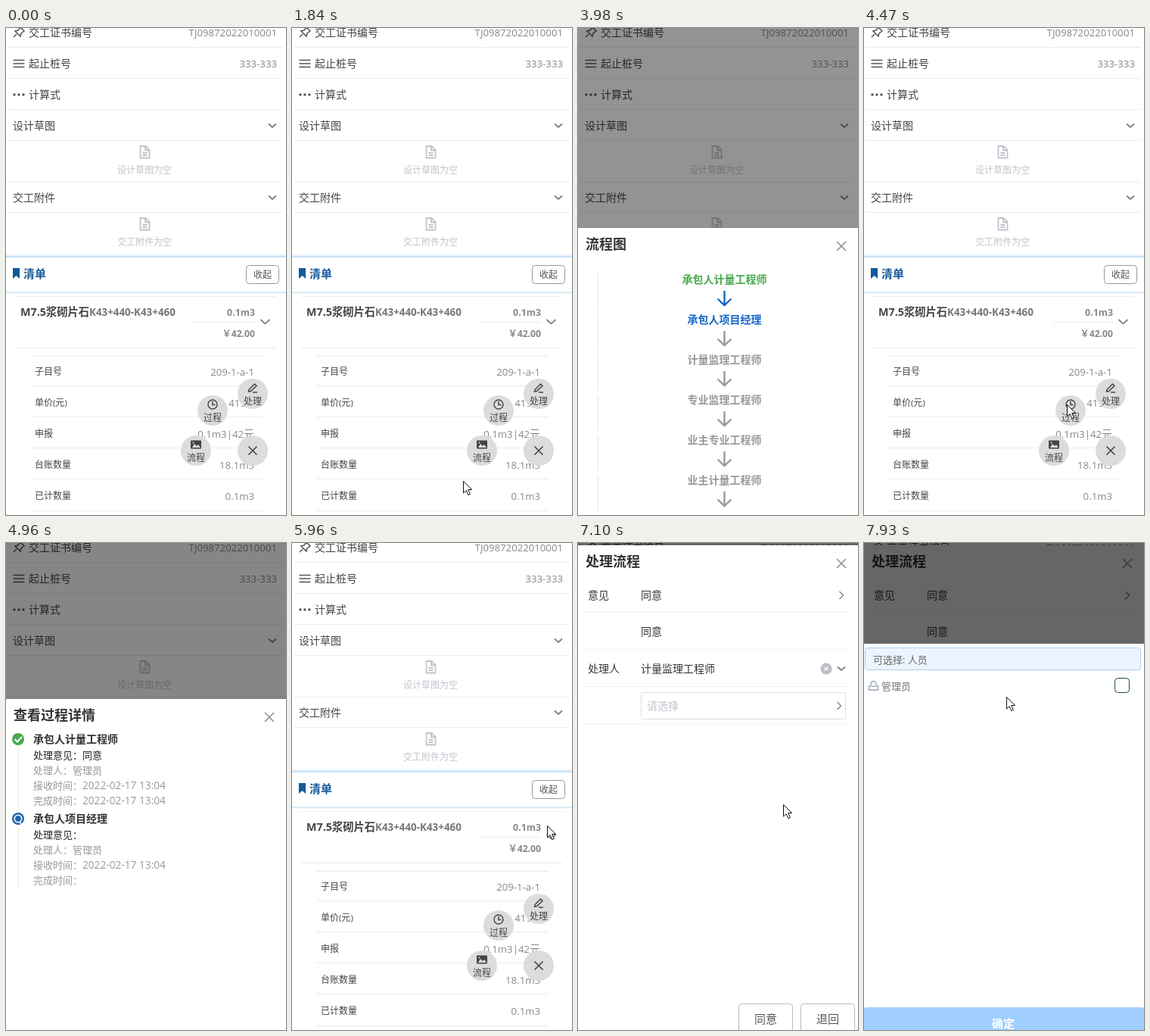
Animation, 370 px wide and 643 px high, one loop 8000 ms. Source, as an HTML page:

```html
<!DOCTYPE html>
<html lang="zh-CN">
<meta charset="utf-8">
<style>
html, body { margin: 0; width: 100%; height: 100%; overflow: hidden; background: #fff }
svg { display: block; font-family: 'Open Sans', 'Noto Sans CJK SC', 'Noto Sans CJK', sans-serif }
.latin { font-size: .943em }
</style>
<svg id="stage" width="370" height="643" viewBox="0 0 370 643"></svg>
<script>
const stage = document.getElementById('stage');

// Text is placed by its vertical centre; Latin runs are set slightly smaller.
function text(x, cy, str, { size = 14, fill = '#444', bold = false, anchor = 'start' } = {}) {
  const body = bold ? str : str.replace(/[!-~]+/g, run => `<tspan class="latin">${run}</tspan>`);
  return `<text x="${x}" y="${cy + size * .37}" font-size="${size}" fill="${fill}" text-anchor="${anchor}"${bold ? ' font-weight="700"' : ''}>${body}</text>`;
}
const path = (d, stroke = '#555', width = 1.5, fill = 'none') =>
  `<path d="${d}" stroke="${stroke}" stroke-width="${width}" fill="${fill}"/>`;
const rect = (x, y, w, h, fill, stroke = 'none', rx = 0) =>
  `<rect x="${x}" y="${y}" width="${w}" height="${h}" rx="${rx}" fill="${fill}" stroke="${stroke}"/>`;
const circle = (x, y, r, fill, stroke = 'none', width = 1.4) =>
  `<circle cx="${x}" cy="${y}" r="${r}" fill="${fill}" stroke="${stroke}" stroke-width="${width}"/>`;
const rule = (y, x1 = 2, x2 = 366, color = '#ececec') => path(`M${x1} ${y}H${x2}`, color, 1);
const down = (x, y, r = 5) => path(`M${x - r} ${y - r / 2}l${r} ${r * .9} ${r} ${-r * .9}`, '#808080', 1.8);
const right = (x, y) => path(`M${x - 2.5} ${y - 5}l5 5-5 5`, '#909090', 1.7);
const cross = (x, y, r, color, width = 1.6) =>
  path(`M${x - r} ${y - r}l${2 * r} ${2 * r}m0 ${-2 * r}l${-2 * r} ${2 * r}`, color, width);

function mainPage() {
  const end = { fill: '#888', anchor: 'end' };
  const pale = { size: 12, fill: '#c0c4cc', anchor: 'middle' };
  const attachment = (y, title) => text(9, y, title) + down(352, y) +
    path(`M177.500 ${y + 27}h7l5 5v10.500h-12zM184 ${y + 27}v5.500h5M180.500 ${y + 36}h6m-6 3h6`, '#c0c4cc', 1.8) +
    text(183, y + 59, title + '为空', pale);
  const rows = [['子目号', '209-1-a-1'], ['单价(元)', '419.9'], ['申报', '0.1m3|42元'],
    ['台账数量', '18.1m3'], ['已计数量', '0.1m3']];
  return rect(0, 0, 370, 643, '#fff') +
    path('M10 12l4-4M12 4l7 7 1-4 4-3-5-5-3 4z') + text(30, 6, '交工证书编号') + text(358, 6, 'TJ09872022010001', end) +
    path('M9.500 42.500h15m-15 4.500h15m-15 4.500h15') + text(30, 47, '起止桩号') + text(358, 47, '333-333', end) +
    [11, 17, 23].map(x => circle(x, 88, 1.7, '#555')).join('') + text(30, 88, '计算式') +
    [25.5, 66.5, 107.5, 148.5, 203.5, 243.5].map(y => rule(y)).join('') +
    attachment(129, '设计草图') + attachment(224, '交工附件') +
    rect(0, 299, 370, 2, '#e6f2fc') + rect(0, 301, 370, 2, '#c6e2f8') +
    rect(0, 348, 370, 2, '#dcebf7') + rect(0, 350, 370, 1, '#f0f7fc') +
    path('M9 317h9v14l-4.500-4-4.500 4z', 'none', 0, '#0f5a9e') +
    text(23, 324, '清单', { size: 15, fill: '#1a5b9c', bold: true }) +
    rect(317.5, 313.5, 43, 24, '#fff', '#999', 4) + text(339, 326, '收起', { size: 12, fill: '#555', anchor: 'middle' }) +
    rule(354.5, 12, 357) + text(19, 375, 'M7.5浆砌片石', { size: 14.3, bold: true }) +
    text(110, 375, 'K43+440-K43+460', { size: 13.4, fill: '#777', bold: true }) +
    text(329, 375, '0.1m3', { ...end, size: 12.4, bold: true }) + rule(388.5, 249, 329) +
    text(329, 403, '￥42.00', { ...end, size: 12.2, bold: true }) + down(342.5, 388, 6) + rule(422.5, 12, 357) +
    rows.map(([name, value], i) => rule([433.5, 472.5, 513.5, 554.5, 595.5][i], 32, 339) +
      text(38, 454 + 41 * i, name, { size: 12 }) + text(328, 454 + 41 * i, value, end)).join('') +
    rule(637.5, 32, 339);
}

function fabMenu() {
  const item = (x, y, label, icon) => circle(x, y, 20, '#dcdcdc') +
    `<g transform="translate(${x} ${y - 8})">${icon}</g>` + text(x, y + 10, label, { size: 12, anchor: 'middle' });
  return item(326, 483, '处理', path('M-5 2.500L2.500-5 5-2.500-2.500 4.500-5.500 5zM0 6h6', '#444')) +
    item(273, 505, '过程', circle(0, 0, 6, 'none', '#444') + path('M0-4V.5H3.500', '#444')) +
    item(251, 558, '流程', rect(-7, -5.5, 14, 11, '#444', 'none', 1) +
      path('M-5 4l3-5 3 3 2-2 3 4z', 'none', 0, '#dcdcdc') + circle(-3.5, -2.5, 1, '#dcdcdc'));
}

const sheet = title => rect(0, 3, 370, 660, '#fff') +
  text(10, 24, title, { size: 18, fill: '#333', bold: true }) + cross(348, 27, 6, '#909090');

function flowSheet() {
  const steps = ['承包人计量工程师', '承包人项目经理', '计量监理工程师', '专业监理工程师', '业主专业工程师', '业主计量工程师', '完成'];
  return sheet('流程图') + steps.map((name, i) => {
    const y = 53 * i, last = i === steps.length - 1;
    const arrow = path(`M193.500 ${y + 86}v19m-9-8.500l9 8.500 9-8.500`, i ? '#999' : '#1467c8', 2.4);
    return path(`M26.500 ${y + 64}v${last ? 18 : 48}`, '#e8e8e8', 1) + (last ? '' : arrow) +
      text(193.5, y + 71, name, { fill: ['#4aa84c', '#1467c8'][i] || '#999', bold: true, anchor: 'middle' });
  }).join('');
}

function detailSheet() {
  const entry = (y, name, opinion, done, mark) => {
    const line = (dy, label, value, fill = '#999') => text(36, y + dy, label, { size: 13, fill }) +
      text(36 + 13 * label.length, y + dy, value, { size: /\d/.test(value) ? 14.5 : 13, fill });
    const time = '2022-02-17 13:04';
    return path(`M16.500 ${y + 12}v81`, '#e4e4e4', 1) + mark + text(36, y, name, { fill: '#333', bold: true }) +
      line(21, '处理意见：', opinion, '#222') + line(41, '处理人：', '管理员') +
      line(61, '接收时间：', time) + line(81, '完成时间：', done ? time : '');
  };
  return sheet('查看过程详情') +
    entry(56, '承包人计量工程师', '同意', true, circle(16, 56, 8, '#4aa84c') + path('M11.500 56l3.500 3.500 6-6.500', '#fff', 2.2)) +
    entry(161, '承包人项目经理', '', false, circle(16, 161, 8, '#2263ae') + circle(16, 161, 4.7, 'none', '#fff', 1.6) +
      path('M17 165l4 3', '#fff', 1.4));
}

function handleSheet() {
  const dark = { fill: '#333' };
  const button = (x, label) => rect(x, 608.5, 71, 40, '#fff', '#bbb', 4) +
    text(x + 35.5, 628, label, { size: 15, fill: '#555', anchor: 'middle' });
  return sheet('处理流程') + text(13, 69, '意见', dark) + text(83, 69, '同意', dark) + right(348, 69) +
    text(83, 117, '同意', dark) + text(13, 166, '处理人', dark) + text(83, 166, '计量监理工程师', dark) +
    circle(328, 166, 7.5, '#bcbfc6') + cross(328, 166, 2.3, '#fff', 1.3) + down(348, 166) +
    [91.5, 140.5, 189.5, 239.5].map(y => rule(y, 6, 360, '#f0f0f0')).join('') +
    rect(83.5, 197.5, 270, 35, '#fff', '#dcdfe6', 2) + text(91, 215, '请选择', { fill: '#c0c4cc' }) + right(345, 215) +
    button(212.5, '同意') + button(294.5, '退回');
}

function pickerSheet() {
  return rect(0, 133, 370, 530, '#fff') + rect(1.5, 138.5, 364, 29, '#ecf5ff', '#a9d0ee', 3) +
    text(12, 154, '可选择: 人员', { size: 13, fill: '#666' }) +
    circle(12.5, 186, 3.5, 'none', '#9aa7b8', 1.3) + path('M9 189H6.500v5h12v-5H16', '#9aa7b8', 1.3) +
    text(23, 189, '管理员', { size: 13, fill: '#777' }) + rect(331.5, 178.5, 19, 19, '#fff', '#1f5228', 4) +
    rect(0, 613, 370, 45, '#a0cfff', 'none', 3) + text(184, 634, '确定', { size: 15, fill: '#fff', bold: true, anchor: 'middle' });
}

// Bottom sheets: opening time, closing time, travel, top of the shaded area
const SLIDE = 320;
const sheets = [
  { draw: flowSheet, open: 2400, close: 3842, travel: 650, top: 0 },
  { draw: detailSheet, open: 4760, close: 5430, travel: 650, top: 0 },
  { draw: handleSheet, open: 6600, close: Infinity, travel: 650, top: 0 },
  { draw: pickerSheet, open: 7560, close: Infinity, travel: 520, top: 3 },
];
const cursorPath = [
  [80, 318, 645], [400, 274, 553], [560, 274, 553], [700, 296, 563], [900, 328, 547], [1390, 328, 547],
  [1410, 316, 542], [1590, 316, 542], [1960, 183, 624], [2330, 245, 565], [2880, 245, 565], [3140, 123, 22],
  [3215, 115, -25], [3540, 132, -25], [3550, 132, 0], [3620, 132, 0], [3630, 132, -25], [4150, 200, -25],
  [4470, 268, 497], [4750, 272, 500], [4940, 250, -25], [5620, 345, -25], [5960, 337, 372], [6200, 339, 522],
  [6450, 317, 480], [6620, 317, 480], [7100, 271, 345], [7400, 220, 214], [7600, 220, 214], [7900, 188, 203],
];

stage.innerHTML = mainPage() + `<g id="menu">${fabMenu()}</g>` + circle(326, 558, 20, '#dcdcdc') +
  `<g id="toggle">${cross(326, 558, 5.5, '#444')}</g>` +
  sheets.map((s, i) => `<rect id="shade${i}" y="${s.top}" width="370" height="643"/><g id="sheet${i}">${s.draw()}</g>`).join('') +
  `<g id="cursor">${path('M.5.500v15.500l3.600-3.400 2.700 6 2.600-1.100-2.700-6h5z', '#111', 1, '#fff')}</g>`;

const el = id => document.getElementById(id);
const clamp = v => Math.min(1, Math.max(0, v));
const ease = v => v * v * (3 - 2 * v);

function cursorAt(t) {
  const next = cursorPath.findIndex(k => k[0] > t);
  if (next < 1) return cursorPath.at(next).slice(1);
  const [t0, x0, y0] = cursorPath[next - 1], [t1, x1, y1] = cursorPath[next];
  const p = (t - t0) / (t1 - t0);
  return [x0 + (x1 - x0) * p, y0 + (y1 - y0) * p];
}

function render(t) {
  const menuOpen = t < 1075 || t >= 1600;
  el('menu').style.display = menuOpen ? '' : 'none';
  el('toggle').setAttribute('transform', `rotate(${menuOpen ? 0 : 45} 326 558)`);
  sheets.forEach((s, i) => {
    const shown = ease(clamp((t - s.open) / SLIDE)) - ease(clamp((t - s.close) / SLIDE));
    // The shade runs a little ahead of the sheet.
    el('shade' + i).setAttribute('opacity', .6 * (1 - (1 - shown) ** 1.35));
    el('sheet' + i).setAttribute('transform', `translate(0 ${Math.round((1 - shown) * s.travel)})`);
    el('sheet' + i).style.display = shown > 0 ? '' : 'none';
  });
  el('cursor').setAttribute('transform', `translate(${cursorAt(t).map(Math.round)})`);
}

const start = performance.now();
(function tick() {
  render((performance.now() - start) % 8000);
  requestAnimationFrame(tick);
})();
</script>
</html>
```
